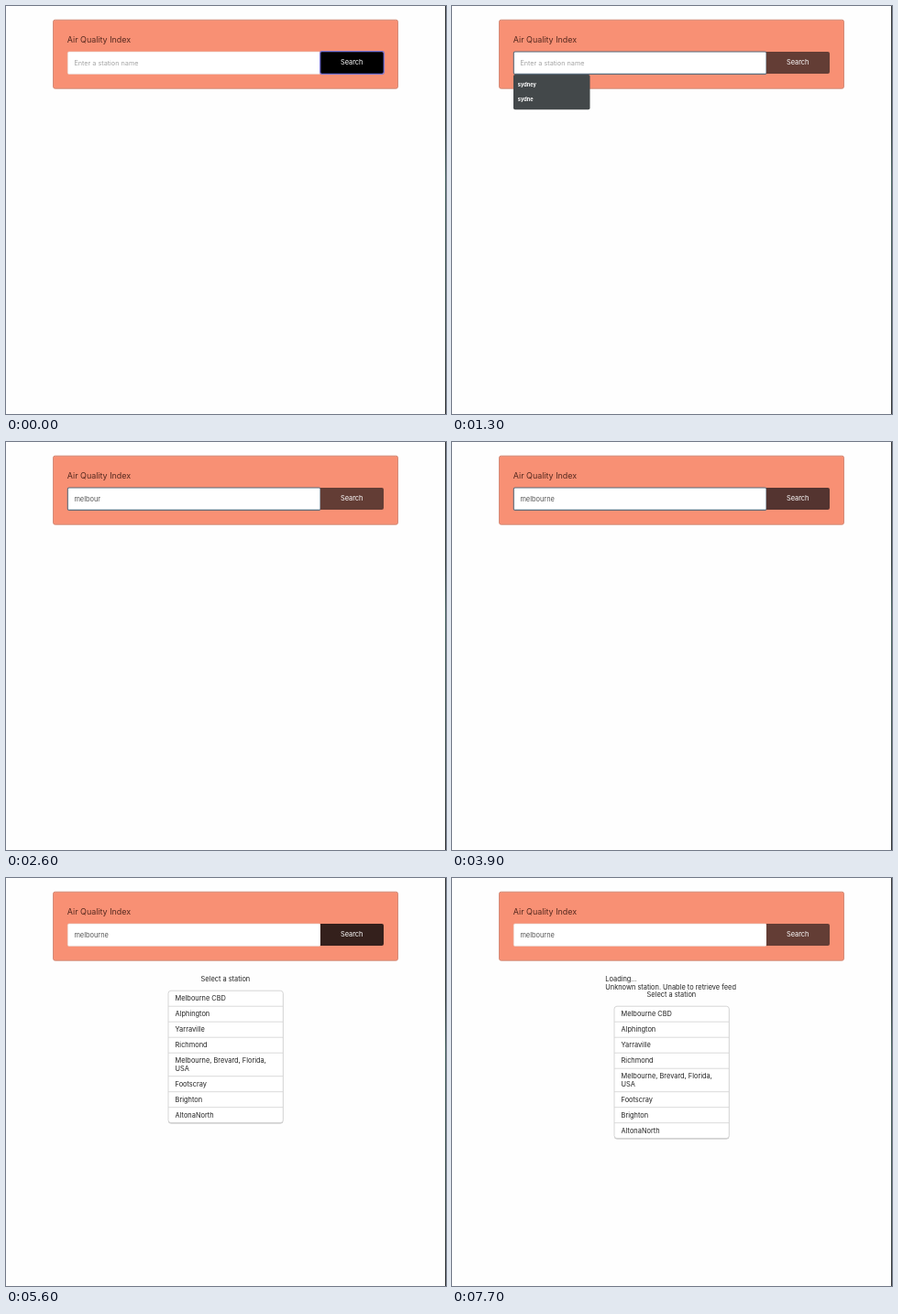
These frames come from a looping animation (480x446 px, 8000 ms). An HTML page:

```html
<!DOCTYPE html>
<html lang="en">
<head>
<meta charset="utf-8">
<title>Air Quality Index</title>
<style>
  html, body { margin: 0; width: 100%; height: 100%; overflow: hidden; background: #fefefe; }
  svg { display: block; width: 480px; height: 446px; }
  text { font: 7.4px Inter, "Open Sans", sans-serif; fill: #222; white-space: pre; }
  .title { font-size: 8.95px; fill: #55291f; }
  .hint { font-size: 7.25px; fill: #a3a3a3; }
  .typed { fill: #555; }
  .label { fill: #fff; text-anchor: middle; }
  .menu text { font-size: 5.6px; font-weight: 700; fill: #fff; }
  .mid { text-anchor: middle; }
</style>
</head>
<body>
<svg viewBox="0 0 480 446">
  <defs>
    <linearGradient id="edge" x1="0" y1="0" x2="0" y2="1">
      <stop offset="0" stop-color="#343638"/>
      <stop offset=".3" stop-color="#34403f"/>
      <stop offset=".42" stop-color="#4a6762"/>
      <stop offset=".8" stop-color="#3c4c4a"/>
      <stop offset="1" stop-color="#2f3133"/>
    </linearGradient>
  </defs>
  <rect x="479" width="1" height="446" fill="url(#edge)"/>

  <rect x="51.5" y="15.2" width="376" height="75" rx="2" fill="#f89074" stroke="#cf8572" stroke-width=".9"/>
  <text class="title" x="66.8" y="40">Air Quality Index</text>

  <rect id="field" x="67.3" y="50" width="275.7" height="24.4" rx="1.5" fill="#fff"/>
  <text id="hint" class="hint" x="74.4" y="64.7">Enter a station name</text>
  <text id="typed" class="typed" x="74.4" y="64.7"></text>
  <rect id="caret" y="57.3" width=".7" height="9.4" fill="#333"/>

  <path id="button" d="M343 50h67a2 2 0 0 1 2 2v20a2 2 0 0 1-2 2h-67z"/>
  <rect id="ring" x="342.7" y="49.6" width="69.6" height="24.8" rx="1.8" fill="none" stroke="#7773d2" stroke-width="1.3"/>
  <text class="label" x="377.2" y="64.4">Search</text>

  <g id="menu" class="menu">
    <rect x="67" y="75" width="83.5" height="38.2" rx="1.8" fill="#43484a"/>
    <text x="71.8" y="88.3">sydney</text>
    <text x="71.8" y="104.2">sydne</text>
  </g>

  <g id="results">
    <text id="loading" y="113.2">Loading...</text>
    <text id="error" x="167.3">Unknown station. Unable to retrieve feed</text>
    <g id="stations">
      <text class="mid" x="239.4" y="113.2">Select a station</text>
      <rect x="177" y="124" width="125.3" height="144.4" rx="3" fill="#bcbcbc"/>
      <rect x="177" y="123.2" width="125.3" height="144.4" rx="3" fill="#fff" stroke="#d2d2d2" stroke-width=".9"/>
    </g>
  </g>
</svg>
<script>
const LOOP = 8000, LINE = 8.5;
const $ = id => document.getElementById(id);

// Latest value whose start time has passed.
const at = (track, t) => track.reduce((v, [start, next]) => t >= start ? next : v, track[0][1]);
const within = (t, a, b) => t >= a && t < b;
const show = (id, on) => $(id).setAttribute("visibility", on ? "visible" : "hidden");
const set = (id, name, value) => $(id).setAttribute(name, value);

function add(tag, attrs, content = "") {
  const el = document.createElementNS("http://www.w3.org/2000/svg", tag);
  for (const k in attrs) el.setAttribute(k, attrs[k]);
  el.textContent = content;
  $("stations").append(el);
}

const stations = [
  ["Melbourne CBD"], ["Alphington"], ["Yarraville"], ["Richmond"],
  ["Melbourne, Brevard, Florida,", "USA"],
  ["Footscray"], ["Brighton"], ["AltonaNorth"]
];
let y = 123.2;
stations.forEach((lines, i) => {
  if (i) add("path", { d: `M177 ${y}H302.3`, stroke: "#d6d6d6", "stroke-width": .9 });
  lines.forEach((s, n) => add("text", { x: 184.6, y: y + 11 + n * LINE }, s));
  y += 8.5 + lines.length * LINE;
});

const word = "melbourne";
const letters = [[0, 0], [1400, 1], [1500, 2], [1600, 3], [1700, 4], [1900, 6], [2100, 7], [3000, 8], [3100, 9]];
const caretOn = [[0, false], [700, true], [1200, false], [1400, true], [2600, false], [3000, true], [3600, false]];
const buttonFill = [[0, "#000"], [700, "#34201c"], [800, "#633d35"], [3900, "#543430"],
  [4000, "#1c1110"], [4100, "#000"], [5600, "#34201c"], [5700, "#633d35"]];

function draw(t) {
  const focused = within(t, 700, 4000);
  const loading = within(t, 5700, 6100) || t >= 7700;
  const failed = t >= 6100;
  const typed = word.slice(0, at(letters, t));

  set("field", "stroke", focused ? "#596b7b" : "#e6d5cf");
  set("field", "stroke-width", focused ? 1.1 : .6);
  $("typed").textContent = typed;
  show("hint", !typed);
  show("caret", at(caretOn, t));
  set("caret", "x", 74.4 + (typed ? $("typed").getComputedTextLength() : 0));

  set("button", "fill", at(buttonFill, t));
  show("ring", t < 700 || within(t, 4000, 5600));
  show("menu", within(t, 800, 1400));

  show("results", t >= 4500);
  $("results").style.display = t >= 4500 ? "" : "none";
  show("loading", loading);
  set("loading", "x", failed ? 167.3 : 176.8);
  show("error", failed);
  set("error", "y", 113.2 + loading * LINE);
  set("stations", "transform", `translate(0 ${(loading + failed) * LINE})`);
}

const begin = performance.now();
function tick() {
  draw((performance.now() - begin) % LOOP);
  requestAnimationFrame(tick);
}
tick();
</script>
</body>
</html>
```
